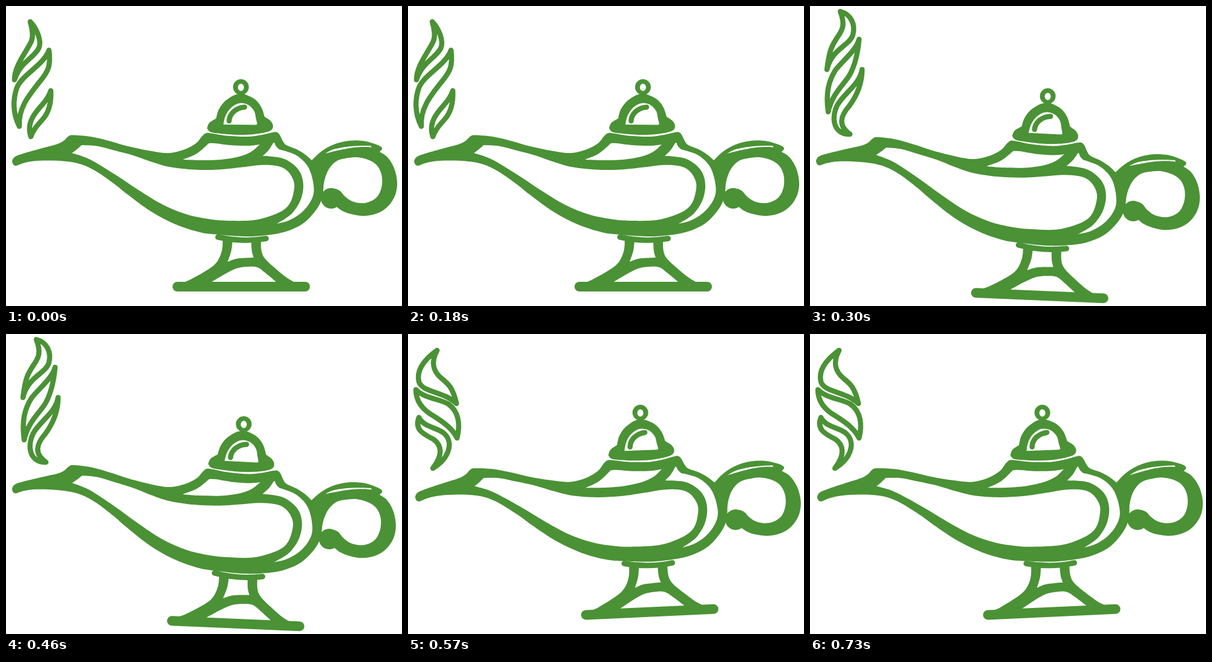
Write an HTML page with a canvas that moves like this. It is 654 px wide and 496 px high and loops after 0.84 s.

```html
<!DOCTYPE html>
<html lang="en">
<head>
<meta charset="utf-8">
<title>Magic lamp</title>
<style>
  html, body { margin: 0; width: 100%; height: 100%; overflow: hidden; background: #fff; }
  canvas { display: block; }
</style>
</head>
<body>
<canvas id="stage" width="654" height="496"></canvas>
<script>
const ctx = document.getElementById('stage').getContext('2d');
const GREEN = '#4a9235';
const LOOP = 840;

// Closed outline of smooth runs; "/" marks a sharp corner at the point before it.
function outline(text) {
  const path = new Path2D();
  const runs = text.split('/').map(run => run.trim().split(/\s+/).map(p => p.split(',').map(Number)));
  let last = runs[0][0];
  path.moveTo(...last);
  runs.forEach((run, n) => {
    const pts = n ? [last, ...run] : run;
    for (let i = 0; i < pts.length - 1; i++) {
      const b = pts[i], c = pts[i + 1];
      const a = pts[i - 1] || b, d = pts[i + 2] || c;
      path.bezierCurveTo(
        b[0] + (c[0] - a[0]) / 6, b[1] + (c[1] - a[1]) / 6,
        c[0] - (d[0] - b[0]) / 6, c[1] - (d[1] - b[1]) / 6,
        c[0], c[1]);
    }
    last = pts[pts.length - 1];
  });
  path.closePath();
  return path;
}

function oval(x, y, rx, ry) {
  const path = new Path2D();
  path.ellipse(x, y, rx, ry, 0, 0, Math.PI * 2);
  return path;
}

function bar(x, y, w, h, r) {
  const path = new Path2D();
  path.roundRect(x, y, w, h, r);
  return path;
}

const solids = [
  // body
  outline(`10,257 12,252 17,248 30,243.5 60,235 84,228.5 95,223 103,215.5 111,213.5 140,216
    170,223 200,231.5 235,239 262,243 280,241.5 300,235 315,226 324,215 331,210 342,211 365,214.5
    400,216 425,212.5 440,209 447,208.5 452,213 457,223 463,230 480,237 494,245.5 505,255 /
    518,275 524,300 521,321 510,340 490,360 462,373 430,379 395,381 350,378 320,374 280,361
    240,340 200,311 180,295 150,274 125,262 100,257 70,255.5 45,256.5 28,260 17,264 12,262 10,257`),
  // handle
  outline(`505,255 520,241 540,229.5 565,223 590,223 609,228 619,232.5 621,236.5 617,241 /
    630,250 641,268 646,291 643,312 632,330 615,342 592,347 570,344 556,339 546,332 / 537,318 /
    544,302 / 552,306 560,315 572,323 590,326 606,321 616,311 621,295 620,278 613,264 600,255
    580,250 560,252 545,257 533,270 526,288 524,304 / 510,300 / 505,255`),
  oval(537, 318, 17, 17),
  // lid
  outline(`332,202 336,193 347,186 / 351,172 360,159 372,150 381,146 388,145 397,147 412,155
    422,168 427,183 / 437,190 441,199 435,207 410,212 380,213 350,210.5 337,208 332,202`),
  oval(388, 134, 13, 13),
  // foot
  outline(`358,386 357,402 352,417 343,429 325,441 305,452 291,458 / 480,458 / 475,456 462,448
    445,434 428,418 422,405 421,386`),
  bar(275, 456, 227, 16, 8)
];

const gaps = [
  // belly
  outline(`109,243 117,237 125,230 / 150,231.5 180,239 210,247 240,257.5 270,266 310,270.5 350,270.5
    390,266.5 420,263 445,264 460,269 470,279 476,293 475,308 470,324 460,336 440,346 410,354
    370,355 340,353 300,345 260,329 220,305 190,285 160,266 135,252 109,243`),
  // collar
  outline(`292,254 315,244 335,227 / 345,227 370,230 400,231 419,229 / 405,241 385,249 355,254 320,255 292,254`),
  // crescent
  outline(`441,227 434,238 424,248 / 440,249 460,253 478,265 488,280 491,300 486,322 474,341 462,351
    447,360 / 466,355 485,344 500,328 508,310 507,290 501,270 492,257 478,246 462,240 451,237 /
    446,232 443,226 441,227`),
  // handle sliver
  outline(`527,244 541,237 565,232.5 585,231 602,231 / 604,233.5 / 588,233 570,234.5 545,239.5 527,244`),
  // dome
  outline(`359,196 / 362,183 369,171 379,163 389,160.5 401,164 410,174 413,187 415,195 / 413,196.5`),
  oval(388, 134.5, 5, 6),
  // foot
  outline(`374,388 372,405 366,423 / 380,418 395,416.5 409,416 / 406,405 405,388`),
  outline(`340,456 360,444 380,434 399,431 415,432 428,441 446,456`)
];

const strokes = [
  [new Path2D('M368.5 190C369 178 380 168 394 167.2'), 8.5],
  [new Path2D('M350 382Q390 391 429.5 384.5'), 9]
];

// Each pose: end time, lamp transform (sin, dx, dy), smoke wisps.
const poses = [
  { until: 300, sin: 0, dx: 0, dy: 0, smoke: [
    'M40 26C50 36 60 58 54 70C46 86 24 92 14 122C14 98 34 76 42 58C46 48 43 36 40 26Z',
    'M71 73C74 98 71 107 55 126C36 150 20 170 22 199C10 176 12 152 18 135C27 113 62 98 71 73Z',
    'M74 140C75 160 71 176 60 188C51 198 45 205 41 216C36 200 40 188 50 175C60 162 69 155 74 140Z'] },
  { until: 570, sin: 0.0418, dx: 10.6, dy: -1.1, smoke: [
    'M50 9C68 14 75 30 71 47C66 66 36 70 28 105C32 72 36 66 45 52C55 38 58 30 50 9Z',
    'M81 55C79 78 73 100 66 113C58 128 36 145 30 175C26 145 30 125 42 106C54 90 76 74 81 55Z',
    'M86 105C86 130 76 150 65 165C50 182 46 198 66 212C36 212 36 182 45 164C57 143 82 130 86 105Z'] },
  { until: LOOP, sin: -0.0455, dx: -10, dy: 13.8, smoke: [
    'M48 27C30 40 13 58 18 79C24 97 58 94 80 115C74 88 66 82 55 73C42 62 37 48 48 27Z',
    'M13 92C28 107 52 107 67 116C83 128 87 148 81 172C72 154 55 144 43 136C25 126 13 112 13 92Z',
    'M18 138C26 154 46 154 58 163C77 178 68 206 41 222C58 200 56 184 42 174C26 166 10 158 18 138Z'] }
];
poses.forEach(pose => { pose.smoke = pose.smoke.map(d => new Path2D(d)); });

function fillAll(paths, color) {
  ctx.fillStyle = color;
  paths.forEach(path => ctx.fill(path));
}

function drawLamp({ sin, dx, dy }) {
  const cos = Math.sqrt(1 - sin * sin);
  ctx.setTransform(cos, sin, -sin, cos, dx, dy);
  fillAll(solids, GREEN);
  fillAll(gaps, '#fff');
  for (const [path, width] of strokes) {
    ctx.lineWidth = width;
    ctx.stroke(path);
  }
  ctx.resetTransform();
}

function draw(time) {
  const pose = poses.find(p => time < p.until);
  ctx.fillStyle = '#fff';
  ctx.fillRect(0, 0, 654, 496);
  ctx.strokeStyle = GREEN;
  ctx.lineCap = ctx.lineJoin = 'round';
  drawLamp(pose);
  ctx.lineWidth = 8.5;
  pose.smoke.forEach(path => ctx.stroke(path));
}

const start = performance.now();
function tick() {
  draw((performance.now() - start) % LOOP);
  requestAnimationFrame(tick);
}
tick();
</script>
</body>
</html>
```
